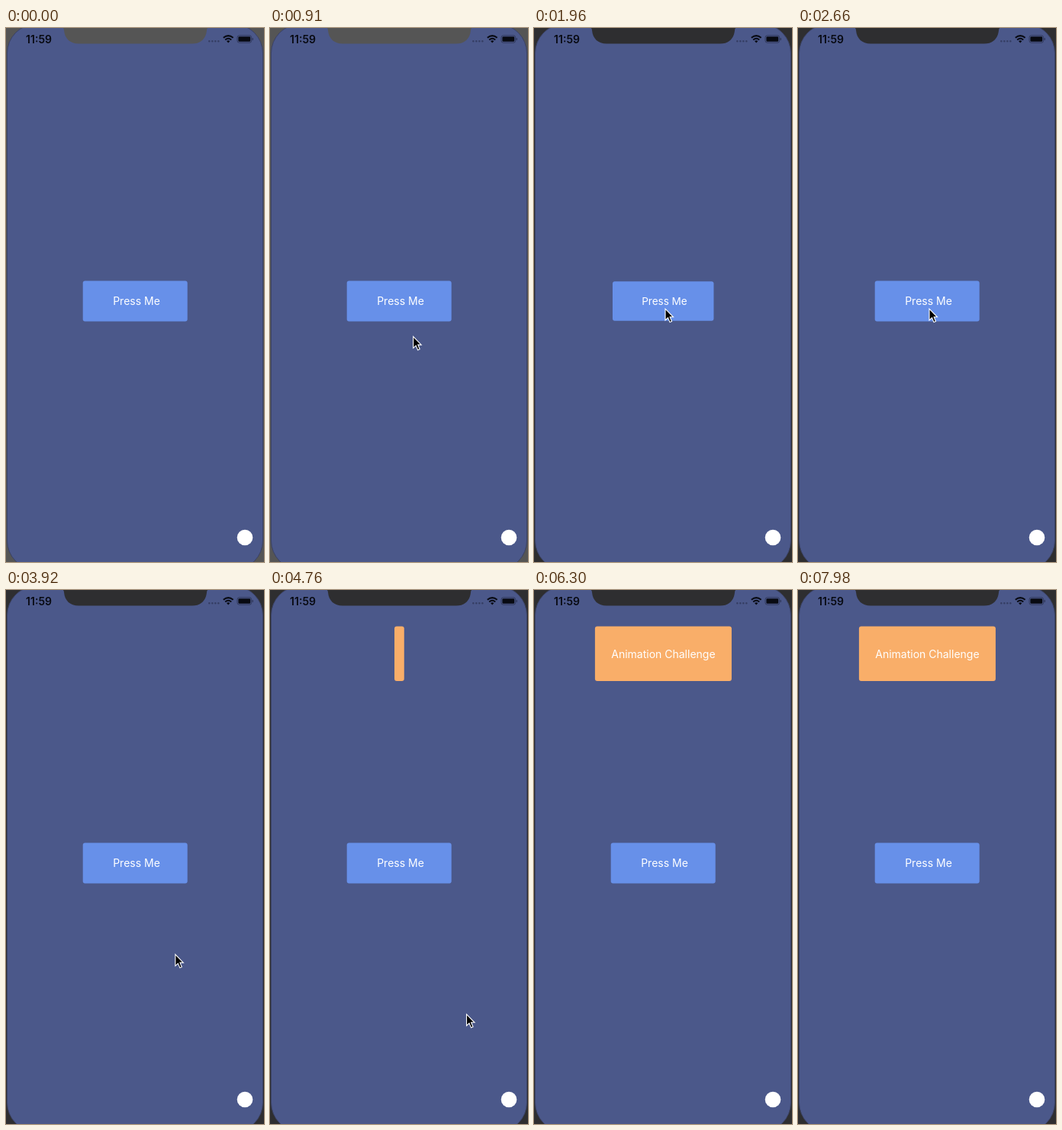
These frames come from a looping animation (338 by 698 pixels, 8 s). An HTML page:

```html
<!DOCTYPE html>
<html lang="en">
<head>
<meta charset="utf-8">
<title>Press button</title>
<style>
  html, body { margin: 0; width: 100%; height: 100%; overflow: hidden; background: #2e2e30; }
  svg { display: block; width: 100%; height: 100%; }
  text { font: 14px Inter, Roboto, sans-serif; fill: #fff; text-anchor: middle; }
  .clock { font-weight: 600; fill: #080a12; }
</style>
</head>
<body>
<svg viewBox="0 0 338 698">
  <rect class="bezel" width="338" height="698"/>
  <rect x="1.5" y="-5" width="335" height="713" rx="38" fill="#4b588a" stroke="#3b4265"/>
  <path class="bezel" d="M73 -1Q76 0 76 3C77 14 84 20.5 95 20.5H244C255 20.5 262 14 263 3Q263 0 266 -1Z"/>

  <text class="clock" x="43" y="19.5">11:59</text>
  <g fill="#353e64">
    <circle cx="266.3" cy="17.3" r="1.2"/><circle cx="270.3" cy="17.3" r="1.2"/>
    <circle cx="274.3" cy="17.3" r="1.2"/><circle cx="278.3" cy="17.3" r="1.2"/>
  </g>
  <g fill="none" stroke="#080a12" stroke-width="2">
    <path d="M284.8 12.8Q291.2 7.4 297.6 12.8M287.2 15.4Q291.2 12 295.2 15.4"/>
    <path d="M289 17L291.2 19.4L293.4 17Q291.2 15.5 289 17Z" fill="#080a12" stroke="none"/>
    <rect x="303" y="9.8" width="18.6" height="9.4" rx="2.6" stroke="#30385a" stroke-width="1"/>
    <rect x="304.4" y="11.2" width="15.8" height="6.6" rx="1.4" fill="#080a12" stroke="none"/>
    <path d="M323.2 13V16" stroke="#30385a" stroke-width="1.2"/>
  </g>

  <rect id="banner" y="47.5" height="71.5" rx="3" fill="#f9ae69"/>
  <text id="bannerText" x="169.4" y="88.5">Animation Challenge</text>

  <g id="button">
    <rect x="100.7" y="330.5" width="137" height="53" rx="3" fill="#6790e9"/>
    <text x="171" y="362">Press Me</text>
  </g>

  <circle cx="313" cy="666" r="10.3" fill="#fff"/>
  <path id="cursor" d="M0 0V15L3.5 11.8L6 17.6L8.5 16.5L6.1 10.8H10.5Z" fill="#000" stroke="#fff" stroke-width="1.1"/>
</svg>
<script>
const LOOP = 8000;
const CENTER = { x: 169.4, y: 357 };
const $ = id => document.getElementById(id);
const bezels = document.querySelectorAll('.bezel');

const progress = (t, start, end) => Math.min(1, Math.max(0, (t - start) / (end - start)));
const easeIn = u => u ** 1.72;
const easeInOut = u => u < 0.5 ? easeIn(2 * u) / 2 : 1 - easeIn(2 - 2 * u) / 2;
const ease = (t, start, end) => easeInOut(progress(t, start, end));

// Each move: start and end time, then the offset travelled.
const cursorMoves = [
  [350, 1080, -118, -273],
  [3470, 4290, 85.5, 187.5],
  [5450, 6020, 86, 20],
];

function drawCursor(t) {
  let x = 290, y = 640;
  for (const [start, end, dx, dy] of cursorMoves) {
    const p = ease(t, start, end);
    x += dx * p;
    y += dy * p;
  }
  $('cursor').setAttribute('transform', `translate(${x} ${y})`);
  $('cursor').setAttribute('visibility', t >= 350 && t < 6020 ? 'visible' : 'hidden');
}

function drawButton(t) {
  const scale = 1 - 0.05 * (ease(t, 1400, 1800) - ease(t, 1800, 2200));
  $('button').setAttribute('transform',
    `translate(${CENTER.x} ${CENTER.y}) scale(${scale}) translate(${-CENTER.x} ${-CENTER.y})`);
}

function drawBanner(t) {
  const width = 179 * ease(t, 4600, 5600);
  $('banner').setAttribute('x', CENTER.x - width / 2);
  $('banner').setAttribute('width', width);
  $('bannerText').setAttribute('opacity', progress(t, 5600, 5900));
}

function draw(now) {
  const t = now % LOOP;
  const bezelColor = t < 1330 ? '#555555' : '#2e2e30';
  bezels.forEach(b => b.setAttribute('fill', bezelColor));
  drawCursor(t);
  drawButton(t);
  drawBanner(t);
}

const origin = performance.now();
function tick() {
  draw(performance.now() - origin);
  requestAnimationFrame(tick);
}
tick();
</script>
</body>
</html>
```
